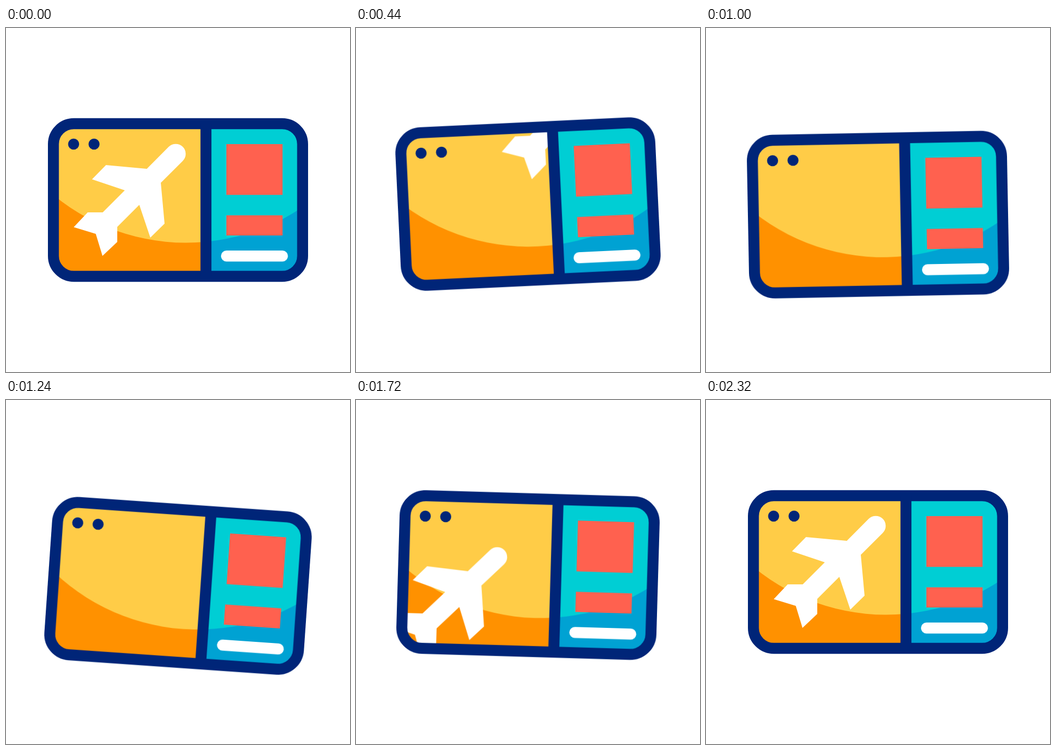
An HTML page without scripts for the animation above (2.56 s loop, 640 by 640 pixels).

```html
<!DOCTYPE html>
<html lang="en">
<head>
<meta charset="utf-8">
<title>Flight ticket</title>
<style>
  html, body { margin: 0; height: 100%; overflow: hidden; background: #fff; }
  svg { display: block; width: 100%; height: 100%; }

  .bob, .tilt, .plane, .spark {
    animation: 2560ms cubic-bezier(.37, 0, .63, 1) infinite;
  }
  .bob { animation-name: bob; }
  .tilt { animation-name: tilt; transform-origin: 320px 320px; }
  .plane { animation-name: fly; fill: #fff; }
  .spark {
    animation-name: spark;
    fill: none;
    stroke: #002578;
    stroke-width: 20;
    stroke-linecap: round;
    stroke-dasharray: 1 3;
    visibility: hidden;
  }

  @keyframes bob {
    0%, 5.66% { transform: translateY(0); }
    38.28%, 43.36% { transform: translateY(27.2px); }
    77.62%, 100% { transform: translateY(0); }
  }
  @keyframes tilt {
    0%, 4.88% { transform: rotate(0deg); }
    28.9% { transform: rotate(-5.2deg); }
    51.17% { transform: rotate(4.3deg); }
    79.3%, 100% { transform: rotate(0deg); }
  }
  /* leaves at the top right, comes back from the bottom left */
  @keyframes fly {
    0%, 5.66% { transform: translate(0, 0); }
    26.76%, 45.3% { transform: translate(260px, -260px); }
    45.31% { transform: translate(-260px, 260px); }
    76.76%, 100% { transform: translate(0, 0); }
  }
  @keyframes spark {
    0%, 75% { visibility: hidden; stroke-dashoffset: 1; animation-timing-function: step-end; }
    75.01% { visibility: visible; stroke-dashoffset: 1; animation-timing-function: ease-out; }
    82.8% { visibility: visible; stroke-dashoffset: 0; animation-timing-function: linear; }
    90.6% { visibility: visible; stroke-dashoffset: -1; animation-timing-function: step-end; }
    90.61%, 100% { visibility: hidden; stroke-dashoffset: -1; }
  }
</style>
</head>
<body>
<svg viewBox="0 0 640 640">
  <defs>
    <clipPath id="inside"><rect x="90" y="180" width="460" height="280" rx="36"/></clipPath>
    <clipPath id="left"><path d="M80 170H372V470H80Z"/></clipPath>
    <clipPath id="right"><path d="M372 170H560V470H372Z"/></clipPath>
    <circle id="horizon" cx="335" cy="11.5" r="388"/>
    <path id="ray" class="spark" pathLength="1" d="M246 167L276 205"/>
  </defs>

  <g class="bob"><g class="tilt">
    <g clip-path="url(#inside)">
      <g clip-path="url(#left)">
        <path fill="#ff9100" d="M80 170H372V470H80Z"/>
        <use href="#horizon" fill="#ffcc47"/>
        <path class="plane" d="M262 262L186 255L160 281.5L221 302L180 343H152L126 370.5L167 383L179.5 424L207 398V370L248 329L268.5 390L295 364L288 288L328.9 247.3A18.5 18.5 0 0 0 302.7 221.1Z"/>
      </g>
      <g clip-path="url(#right)">
        <path fill="#00a2d3" d="M372 170H560V470H372Z"/>
        <use href="#horizon" fill="#00ced4"/>
        <path fill="#ff614f" d="M410 216H514.5V310.5H410ZM410 348.5H514.5V386H410Z"/>
        <rect x="400" y="414" width="124.5" height="20.5" rx="10.25" fill="#fff"/>
      </g>
    </g>
    <g fill="#002578">
      <circle cx="125.8" cy="216" r="10.3"/>
      <circle cx="163.8" cy="216" r="10.3"/>
    </g>
    <g fill="none" stroke="#002578" stroke-width="20.4">
      <rect x="88.2" y="178" width="463.6" height="284" rx="38"/>
      <path d="M372 178V462"/>
    </g>
  </g></g>

  <g transform="translate(320 320.5)">
    <use href="#ray"/>
    <use href="#ray" transform="scale(-1 1)"/>
    <use href="#ray" transform="scale(1 -1)"/>
    <use href="#ray" transform="scale(-1 -1)"/>
  </g>
</svg>
</body>
</html>
```
